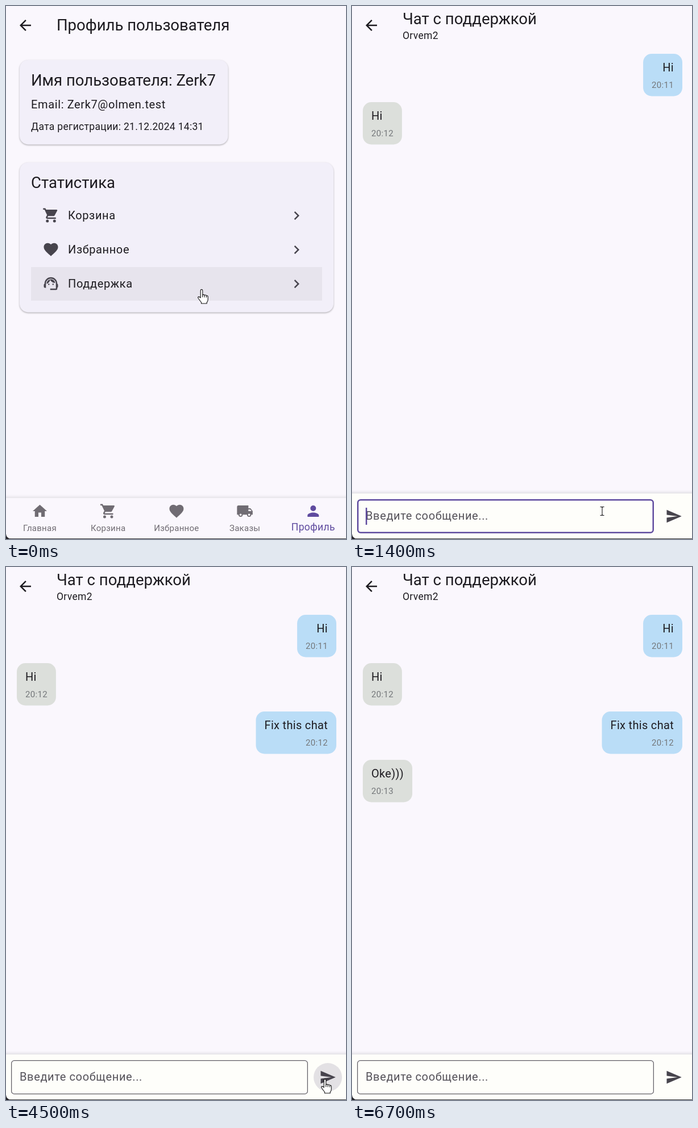
Animation, 598 px wide and 937 px high, one loop 7000 ms. Source, as an HTML page with a canvas:

```html
<!DOCTYPE html>
<html lang="ru">
<head>
<meta charset="utf-8">
<title>Чат с поддержкой</title>
<style>
html, body { margin: 0; width: 100%; height: 100%; overflow: hidden; background: #faf7fd; }
canvas { display: block; }
</style>
</head>
<body>
<canvas id="stage" width="598" height="937"></canvas>
<script>
const W = 598, H = 937, LOOP = 7000, STEP = 100;
const ctx = document.getElementById('stage').getContext('2d');

const C = {
  page: '#faf7fd', card: '#f2eff9', tile: '#e7e4ed', ink: '#1d1b20', icon: '#47444d',
  muted: '#706c73', accent: '#5f4b9f', mine: '#baddf7', theirs: '#dcdfdb',
  bar: '#fefefa', hint: '#55525a', time: '#74777a', hover: '#e3e1e4'
};

const ICON = {
  back: 'M20 11H7.83l5.59-5.59L12 4l-8 8 8 8 1.41-1.41L7.83 13H20z',
  cart: 'M7 18a2 2 0 1 0 0 4a2 2 0 1 0 0-4zM1 2v2h2l3.6 7.59-1.35 2.45C4.5 15.4 5.5 17 7 17h12v-2H7.42q-.3-.1-.22-.37l.9-1.63h7.45c.75 0 1.41-.41 1.75-1.03l3.58-6.49A1 1 0 0 0 20 4H5.21l-.94-2zM17 18a2 2 0 1 0 0 4a2 2 0 1 0 0-4z',
  heart: 'M12 21.35l-1.45-1.32C5.4 15.36 2 12.28 2 8.5 2 5.42 4.42 3 7.5 3c1.74 0 3.41.81 4.5 2.09C13.09 3.81 14.76 3 16.5 3 19.58 3 22 5.42 22 8.5c0 3.78-3.4 6.86-8.55 11.54z',
  home: 'M10 20v-6h4v6h5v-8h3L12 3 2 12h3v8z',
  truck: 'M20 8h-3V4H3a2 2 0 0 0-2 2v11h2a3 3 0 0 0 6 0h6a3 3 0 0 0 6 0h2v-5zM6 15.5a1.5 1.5 0 1 0 0 3a1.5 1.5 0 1 0 0-3zM19.5 9.5l1.96 2.5H17V9.5zM18 15.5a1.5 1.5 0 1 0 0 3a1.5 1.5 0 1 0 0-3z',
  person: 'M12 4a4 4 0 1 0 0 8a4 4 0 1 0 0-8zM12 14c-2.67 0-8 1.34-8 4v2h16v-2c0-2.66-5.33-4-8-4z',
  support: 'M21 12.22C21 6.73 16.74 3 12 3c-4.69 0-9 3.65-9 9.28-.6.34-1 .98-1 1.72v2a2 2 0 0 0 2 2h1v-6.1a7 7 0 0 1 14 0V19h-8v2h8a2 2 0 0 0 2-2v-1.22c.59-.31 1-.92 1-1.64v-2.3c0-.7-.41-1.31-1-1.62zM9 12a1 1 0 1 0 0 2a1 1 0 1 0 0-2zM15 12a1 1 0 1 0 0 2a1 1 0 1 0 0-2zM18 11.03C17.52 8.18 15.04 6 12.05 6c-3.03 0-6.29 2.51-6.03 6.45 2.47-1.01 4.33-3.21 4.86-5.89 1.31 2.63 4 4.44 7.12 4.47z',
  chevron: 'M10 6L8.59 7.41 13.17 12l-4.58 4.59L10 18l6-6z',
  send: 'M2.01 21L23 12 2.01 3 2 10l15 2-15 2z'
};
for (const k in ICON) ICON[k] = new Path2D(ICON[k]);

const ARROW = new Path2D('M.5.5V17l3.9-3.6 2.8 5.9 2.2-1-2.7-5.7 5.2-.5z');
const HAND = new Path2D('M-1.8 14V1.2a1.8 1.8 0 0 1 3.6 0V9q1.8-1.4 3.4.4q2-1 3.3.8q2.5-.4 2.7 2V17q0 3-2 5v2H-.5v-2Q-3 19-6 14.5q-1-2 .8-2.4Q-3.5 12-1.8 14z');
const FINGERS = new Path2D('M1.8 9v4M5.2 9.8v3.4M8.5 10.6v3');
const BEAM = new Path2D('M-3.5-7.5H-1L0-6.5 1-7.5H3.5M0-6.5V6.5M-3.5 7.5H-1L0 6.5 1 7.5H3.5');

// time, x, y of the pointer tip
const POINTER = [
  [0, 343, 498], [400, 343, 498], [500, 350, 540], [600, 380, 680], [700, 425, 815], [800, 440, 888],
  [3900, 440, 888], [4000, 480, 892], [4100, 535, 898], [4200, 560, 900], [4500, 560, 900],
  [4600, 530, 640], [4700, 456, 306], [4800, 500, 292], [4900, 547, 286], [5300, 547, 286],
  [5400, 520, 290], [5500, 400, 330], [5600, 200, 420], [5700, 104, 443], [5800, 70, 464],
  [5900, 52, 420], [6000, 90, 390], [6100, 49, 372], [6200, 290, 340], [6300, 560, 284], [6400, 547, 286]
];

const TYPED = [
  [1600, 'F'], [1800, 'Fi'], [2000, 'Fix'], [2300, 'Fix '], [2600, 'Fix t'], [2800, 'Fix th'],
  [3000, 'Fix thi'], [3200, 'Fix this '], [3500, 'Fix this c'], [3600, 'Fix this cha'],
  [3700, 'Fix this chat'], [4300, '']
];

const MESSAGES = [
  { at: 600, text: 'Hi', time: '20:11', mine: true },
  { at: 600, text: 'Hi', time: '20:12' },
  { at: 4300, text: 'Fix this chat', time: '20:12', mine: true },
  { at: 5100, text: 'Oke)))', time: '20:13' }
];

const OPEN_AT = 176, OPEN_MS = 300, LOADED_AT = 600, FOCUS_AT = 850, SENT_AT = 4300;

const clamp = v => Math.max(0, Math.min(1, v));
const mix = (a, b, k) => a + (b - a) * k;
const interval = (v, a, b) => clamp((v - a) / (b - a));

function cubic(x1, y1, x2, y2) {
  const at = (a, b, s) => 3 * (1 - s) * (1 - s) * s * a + 3 * (1 - s) * s * s * b + s * s * s;
  return x => {
    let lo = 0, hi = 1;
    for (let i = 0; i < 24; i++) {
      const mid = (lo + hi) / 2;
      if (at(x1, x2, mid) < x) lo = mid; else hi = mid;
    }
    return at(y1, y2, (lo + hi) / 2);
  };
}
const zoomStart = cubic(0.05, 0, 0.1333, 0.06);
const zoomEnd = cubic(0.2083, 0.82, 0.25, 1);
const smooth = cubic(0.4, 0, 0.2, 1);
const zoom = v => v >= 1 ? 1 : v < 1 / 6 ? 0.4 * zoomStart(v * 6) : 0.4 + 0.6 * zoomEnd((v - 1 / 6) * 1.2);

function setFont(size, spacing = 0) {
  ctx.font = `${size}px Roboto, sans-serif`;
  ctx.letterSpacing = spacing + 'px';
}

function text(str, x, y, size, spacing, color = C.ink) {
  setFont(size, spacing);
  ctx.fillStyle = color;
  ctx.fillText(str, x, y);
}

function widthOf(str, size, spacing) {
  setFont(size, spacing);
  return ctx.measureText(str).width;
}

function icon(name, x, y, color = C.icon) {
  ctx.save();
  ctx.translate(x, y);
  ctx.scale(1.25, 1.25);
  ctx.fillStyle = color;
  ctx.fill(ICON[name], 'evenodd');
  ctx.restore();
}

function rounded(x, y, w, h, r) {
  ctx.beginPath();
  ctx.roundRect(x, y, w, h, r);
}

function disc(x, y, r, color) {
  ctx.fillStyle = color;
  ctx.beginPath();
  ctx.arc(x, y, r, 0, Math.PI * 2);
  ctx.fill();
}

function shadowed(color, blur, dy, alpha, draw) {
  ctx.save();
  ctx.shadowColor = `rgba(0,0,0,${alpha})`;
  ctx.shadowBlur = blur;
  ctx.shadowOffsetY = dy;
  ctx.fillStyle = color;
  draw();
  ctx.fill();
  ctx.restore();
}

function fillPage() {
  ctx.fillStyle = C.page;
  ctx.fillRect(0, 0, W, H);
}

function drawProfile(t) {
  fillPage();
  icon('back', 19, 19, C.ink);
  text('Профиль пользователя', 89, 43, 27.5);

  shadowed(C.card, 3, 1.25, 0.3, () => rounded(24, 95, 366.5, 148.5, 15));
  text('Имя пользователя: Zerk7', 44, 140, 27.5);
  text('Email: Zerk7@olmen.test', 44, 180, 20, 0.625);
  text('Дата регистрации: 21.12.2024 14:31', 44, 218, 17.5, 0.3125);

  shadowed(C.card, 3, 1.25, 0.3, () => rounded(24, 275, 552, 263.5, 15));
  text('Статистика', 44, 320, 27.5);
  ctx.fillStyle = C.tile;
  ctx.fillRect(44, 459, 512, 59);
  if (t >= 100) {
    ctx.save();
    ctx.beginPath();
    ctx.rect(44, 459, 512, 59);
    ctx.clip();
    disc(343, 498, 30 + (t - 100) * 0.8, 'rgba(29,27,32,.07)');
    ctx.restore();
  }
  [['cart', 'Корзина'], ['heart', 'Избранное'], ['support', 'Поддержка']].forEach(([name, label], i) => {
    const y = 353 + i * 60;
    icon(name, 64, y);
    text(label, 109, y + 22, 20, 0.625);
    icon('chevron', 496, y + 0.5);
  });

  shadowed(C.page, 6, -1, 0.13, () => { ctx.beginPath(); ctx.rect(-10, 865, W + 20, 90); });
  const tabs = [['home', 'Главная'], ['cart', 'Корзина'], ['heart', 'Избранное'], ['truck', 'Заказы'], ['person', 'Профиль']];
  tabs.forEach(([name, label], i) => {
    const active = i === 4, size = active ? 17.5 : 15, gap = size / 56;
    const x = 59.5 + i * 120.2, color = active ? C.accent : C.muted;
    icon(name, x - 15, 873, color);
    text(label, x - widthOf(label, size, gap) / 2, active ? 922 : 923, size, gap, color);
  });
}

function drawSpinner(ms) {
  const turn = ms / 1333, u = turn % 1;
  const head = smooth(clamp(u * 2)), tail = smooth(clamp(u * 2 - 1));
  const start = Math.PI * (-0.5 + tail * 1.5 + ms / 2222 * 2 + turn * 0.5);
  ctx.strokeStyle = C.accent;
  ctx.lineWidth = 5;
  ctx.beginPath();
  ctx.arc(299.5, 503.5, 22.5, start - 0.06, start + Math.max(0.02, (head - tail) * 1.5 * Math.PI));
  ctx.stroke();
}

function drawMessage(m, i) {
  const y = 84 + i * 85;
  const wText = widthOf(m.text, 20, 0.3125), wTime = widthOf(m.time, 15, 0.3125);
  const w = Math.max(wText, wTime) + 30;
  const x = m.mine ? 581 - w : 19;
  ctx.fillStyle = m.mine ? C.mine : C.theirs;
  rounded(x, y, w, 74.5, 15);
  ctx.fill();
  const place = width => m.mine ? 566 - width : x + 15;
  text(m.text, place(wText), y + 31, 20, 0.3125);
  text(m.time, place(wTime), y + 60, 15, 0.3125, C.time);
}

function drawInput(t) {
  shadowed(C.bar, 6, -1, 0.15, () => { ctx.beginPath(); ctx.rect(-10, 857, W + 20, 100); });

  const focus = t < SENT_AT ? interval(t, FOCUS_AT, FOCUS_AT + 200) : 0;
  const line = mix(1.25, 2.5, focus);
  ctx.lineWidth = line;
  ctx.strokeStyle = `rgb(${mix(96, 95, focus)},${mix(93, 75, focus)},${mix(101, 159, focus)})`;
  rounded(9 + line / 2, 867 + line / 2, 522 - line, 60 - line, 5);
  ctx.stroke();

  const typed = TYPED.reduce((now, [at, str]) => t >= at ? str : now, '');
  if (typed) text(typed, 24, 903, 20, 0.625);
  else text('Введите сообщение...', 24, 903, 20, 0.625, C.hint);
  if (t >= 1400 && t < SENT_AT) {
    ctx.fillStyle = C.accent;
    ctx.fillRect(24 + widthOf(typed, 20, 0.625), 882, 2.5, 30);
  }

  if (t >= 4100 && t < 4600) disc(566, 897, 25, C.hover);
  icon('send', 551, 882);
}

function drawChat(t) {
  fillPage();
  icon('back', 19, 19, C.ink);
  text('Чат с поддержкой', 89, 32, 27.5);
  text('Orvem2', 89, 58, 17.5, 0.3125);
  if (t < LOADED_AT) return drawSpinner(t - OPEN_AT);
  MESSAGES.forEach((m, i) => { if (t >= m.at) drawMessage(m, i); });
  drawInput(t);
}

function scaled(k, draw) {
  ctx.save();
  ctx.translate(W / 2, H / 2);
  ctx.scale(k, k);
  ctx.translate(-W / 2, -H / 2);
  draw();
  ctx.restore();
}

function drawPages(t) {
  const v = clamp((t - OPEN_AT) / OPEN_MS);
  if (v === 1) return drawChat(t);
  const k = zoom(v);
  scaled(mix(1, 1.05, k), () => drawProfile(t));
  ctx.fillStyle = `rgba(0,0,0,${0.6 * interval(v, 0.2075, 0.4175)})`;
  ctx.fillRect(0, 0, W, H);
  ctx.globalAlpha = interval(v, 0.125, 0.25);
  if (ctx.globalAlpha > 0) scaled(mix(0.85, 1, k), () => drawChat(t));
  ctx.globalAlpha = 1;
}

function drawWindowEdge() {
  ctx.fillStyle = '#3a393c';
  ctx.fillRect(0, 936, W, 1);
  ctx.fillStyle = '#222126';
  ctx.beginPath();
  ctx.moveTo(0, 928);
  ctx.quadraticCurveTo(1, 936, 9, 937);
  ctx.lineTo(0, 937);
  ctx.fill();
}

function pointerAt(t) {
  const i = POINTER.findIndex(p => p[0] > t);
  if (i < 0) return POINTER[POINTER.length - 1].slice(1);
  const [t0, x0, y0] = POINTER[i - 1], [t1, x1, y1] = POINTER[i];
  const k = (t - t0) / (t1 - t0);
  return [mix(x0, x1, k), mix(y0, y1, k)];
}

function drawPointer(t) {
  if (t >= 6700) return;
  const [x, y] = pointerAt(t);
  ctx.save();
  ctx.translate(x, y);
  ctx.lineJoin = 'round';
  ctx.strokeStyle = '#111';
  ctx.fillStyle = '#fff';
  ctx.lineWidth = 1.1;
  if (t >= 800 && t < 4100) {
    ctx.strokeStyle = '#fff';
    ctx.lineWidth = 3;
    ctx.stroke(BEAM);
    ctx.strokeStyle = '#111';
    ctx.lineWidth = 1.1;
    ctx.stroke(BEAM);
  } else if (t < 300 || (t >= 4100 && t < 4600)) {
    ctx.translate(1, 1);
    ctx.fill(HAND);
    ctx.stroke(HAND);
    ctx.stroke(FINGERS);
  } else {
    ctx.fill(ARROW);
    ctx.stroke(ARROW);
  }
  ctx.restore();
}

function frame() {
  const t = Math.floor(performance.now() % LOOP / STEP) * STEP;
  drawPages(t);
  drawWindowEdge();
  drawPointer(t);
  requestAnimationFrame(frame);
}
frame();
</script>
</body>
</html>
```
